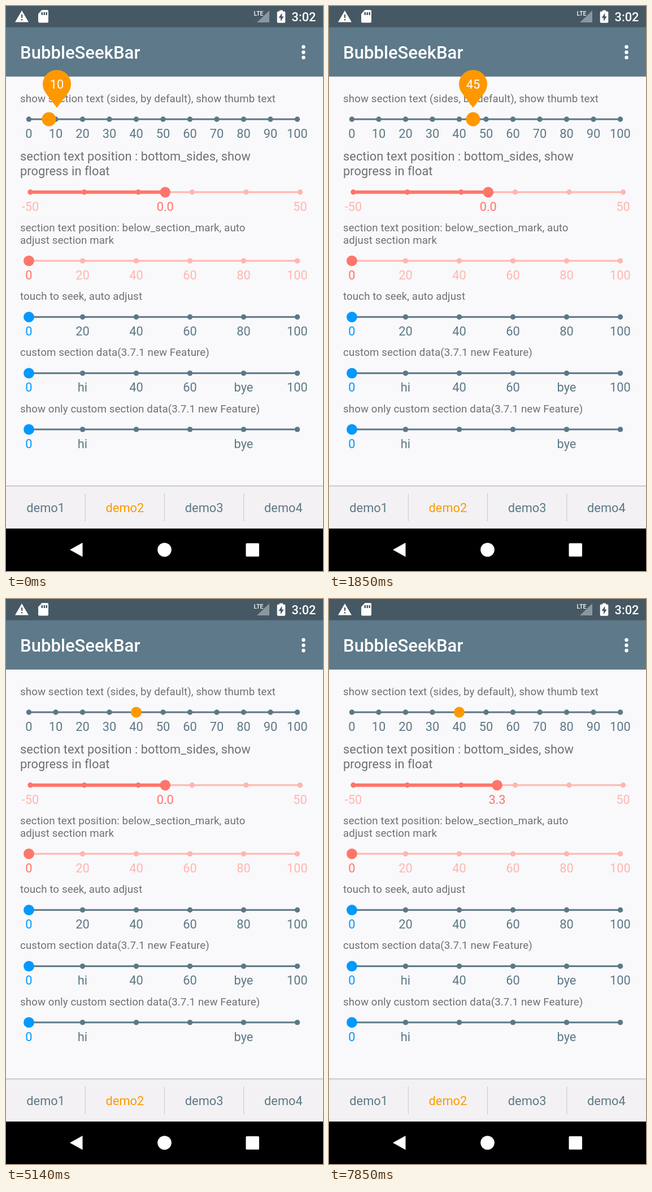
Animation of 561 by 998 pixels, one loop 8000 ms. Source, as an HTML page:

```html
<!DOCTYPE html>
<html lang="en">
<head>
<meta charset="utf-8">
<title>Seek bars</title>
<style>
  html, body { margin: 0; width: 100%; height: 100%; overflow: hidden; background: #f9f8fa; }
  svg { display: block; width: 561px; height: 998px; font: 21.8px Roboto, sans-serif; }
  .label { font-size: 18.7px; letter-spacing: .12px; fill: #706f71; }
  .label.big { font-size: 21.8px; letter-spacing: .04px; }
  .mid { text-anchor: middle; }
</style>
</head>
<body>
<svg id="stage" viewBox="0 0 561 998">
  <rect width="561" height="998" fill="#f9f8fa"/>
  <rect width="561" height="124.7" fill="#5d798a"/>
  <rect width="561" height="37.5" fill="#455864"/>

  <g fill="#fff">
    <path fill-rule="evenodd" d="M28 8 40 28.5H16ZM27 15v6h2.200v-6ZM27 23v2.400h2.200V23Z"/>
    <path fill-rule="evenodd" d="M63.500 7H73q2 0 2 2V27.500q0 2-2 2H59q-2 0-2-2V14ZM62.500 11v5H65v-5ZM66.500 11v5H69v-5ZM70.500 11v5H73v-5Z"/>
    <path fill-rule="evenodd" d="M484 9.500V7.500h6v2h2.500q1.800 0 1.800 1.800V28q0 1.800-1.800 1.800h-11q-1.800 0-1.800-1.800V11.300q0-1.800 1.800-1.800ZM488.300 12.500 482.500 21h3.500v6l5.700-8.500H488.300Z"/>
    <path d="M466 8v21h-22Z" opacity=".38"/>
    <text x="438.500" y="16.500" font-size="10.500" font-weight="500">LTE</text>
    <text x="505.500" y="27" font-weight="500">3:02</text>
    <text x="25" y="93" font-size="31.1" font-weight="500">BubbleSeekBar</text>
    <circle cx="526.500" cy="72.300" r="3.200"/>
    <circle cx="526.500" cy="81.700" r="3.200"/>
    <circle cx="526.500" cy="91" r="3.200"/>
  </g>

  <g id="bars"></g>

  <rect y="848" width="561" height="75" fill="#f3f1f4"/>
  <rect y="846.8" width="561" height="1.7" fill="#c3c2c4"/>
  <g id="tabs"></g>

  <rect y="923" width="561" height="75"/>
  <g fill="#fff">
    <path d="M113 960.500 135.500 948V973Z"/>
    <circle cx="280.500" cy="960.500" r="12.300"/>
    <rect x="424.500" y="949" width="23.500" height="23.500" rx="1.500"/>
  </g>
  <g id="bubbles"></g>
</svg>

<script>
const SLATE = '#5c7887', ORANGE = '#ff9800', RED = '#ff756a', PINK = '#ffb6b0', BLUE = '#0099ff';
const LOOP = 8000, FPS = 7;
const byId = id => document.getElementById(id);
const set = (node, attrs) => { for (const key in attrs) node.setAttribute(key, attrs[key]); };

function el(parent, tag, attrs, text = '') {
  const node = document.createElementNS('http://www.w3.org/2000/svg', tag);
  set(node, attrs);
  node.textContent = text;
  parent.appendChild(node);
  return node;
}

for (let i = 0; i < 4; i++) {
  const tabs = byId('tabs'), width = 140.25;
  el(tabs, 'text', { x: width * (i + 0.5), y: 894, class: 'mid', fill: i === 1 ? ORANGE : SLATE }, `demo${i + 1}`);
  if (i) el(tabs, 'rect', { x: width * i - 0.5, y: 861, width: 1, height: 49, fill: '#c6c5c8' });
}

// Label lines above a track with evenly spaced marks and captions below
function makeBar({ y, lines, captions, color, accent, x0 = 40.5, x1 = 515.5, size = '' }) {
  const g = el(byId('bars'), 'g', {});
  const lineHeight = size ? 25.6 : 21.6;
  lines.forEach((text, i) => {
    const lineY = y - 30.2 - lineHeight * (lines.length - 1 - i);
    el(g, 'text', { x: 25, y: lineY, class: `label ${size}` }, text);
  });
  el(g, 'rect', { x: x0, y: y - 1.5, width: x1 - x0, height: 3, fill: color });
  const step = (x1 - x0) / (captions.length - 1);
  const texts = [], marks = [];
  captions.forEach((text, i) => {
    const x = x0 + step * i;
    marks.push(el(g, 'circle', { cx: x, cy: y, r: 4.7, fill: color }));
    texts.push(el(g, 'text', { x, y: y + 32.7, class: 'mid', fill: color }, text));
  });
  const fill = el(g, 'rect', { x: x0, y: y - 3, width: 0, height: 6, fill: accent });
  const thumb = el(g, 'circle', { cx: x0, cy: y, r: 9.4, fill: accent });
  return { g, texts, marks, fill, thumb, x0, step };
}

const count = (n, by) => Array.from({ length: n }, (_, i) => i * by);
const first = makeBar({
  y: 200, color: SLATE, accent: ORANGE, captions: count(11, 10),
  lines: ['show section text (sides, by default), show thumb text']
});
const second = makeBar({
  y: 328.8, color: PINK, accent: RED, x0: 43, x1: 520.5, size: 'big',
  captions: ['-50', '', '', '', '', '50'],
  lines: ['section text position : bottom_sides, show', 'progress in float']
});
const value = el(second.g, 'text', { y: 361.5, class: 'mid', fill: RED });

const third = makeBar({
  y: 450.1, color: PINK, accent: RED, captions: count(6, 20),
  lines: ['section text position: below_section_mark, auto', 'adjust section mark']
});
third.texts[0].setAttribute('fill', RED);

[
  ['touch to seek, auto adjust', count(6, 20)],
  ['custom section data(3.7.1 new Feature)', [0, 'hi', 40, 60, 'bye', 100]],
  ['show only custom section data(3.7.1 new Feature)', [0, 'hi', '', '', 'bye', '']]
].forEach(([label, captions], i) => {
  const bar = makeBar({ y: 549.3 + 99.3 * i, color: SLATE, accent: BLUE, captions, lines: [label] });
  bar.texts[0].setAttribute('fill', BLUE);
});

// Pin shape: a 240 degree arc closed by two nearly straight sides
function makeBubble(r, top, color, textColor) {
  const g = el(byId('bubbles'), 'g', {});
  const side = r * Math.sqrt(3) / 2, low = 1.5 * r, tip = r * 8 / 3, d = 3.1;
  const path = `M0 ${tip}Q${-side - d} ${low - d} ${-side} ${low}` +
    `A${r} ${r} 0 1 1 ${side} ${low}Q${side + d} ${low - d} 0 ${tip}Z`;
  el(g, 'path', { d: path, fill: color });
  const text = el(g, 'text', { y: r + 7.8, class: 'mid', fill: textColor });
  return (x, opacity, label) => {
    set(g, { transform: `translate(${x} ${top})`, opacity });
    text.textContent = label;
  };
}
const showFirst = makeBubble(25, 113, ORANGE, '#fff');
const showSecond = makeBubble(30, 225.3, PINK, '#53616b');

// Eased change by `amount` between two ticks
function glide(k, from, to, amount) {
  const p = Math.min(1, Math.max(0, (k - from) / (to - from)));
  return amount * p * p * (3 - 2 * p);
}

function drawFirst(k) {
  const x = 76 + glide(k, 0, 5, 147) + glide(k, 6, 7, 32) + glide(k, 13, 16, -20) +
    glide(k, 19, 20, -1) + glide(k, 28, 31, -10.5) + glide(k, 31, 33, 7);
  const bubbleX = x + 14 + glide(k, 0, 3, -14);
  set(first.thumb, { cx: x, r: k < 32 ? 12.5 : 9.4 });
  showFirst(bubbleX, 1 + glide(k, 33, 36, -1), Math.round((bubbleX - first.x0) / 4.75));
}

function drawSecond(k) {
  const { x0, step, thumb, fill, marks } = second;
  const progress = glide(k, 40, 44, -19.1) + glide(k, 48, 51, 22.4);
  const x = x0 + (progress + 50) / 20 * step;
  const held = k >= 40 && k < 52;
  const label = progress.toFixed(1);
  set(thumb, { cx: x, r: held ? 12.5 : 9.4 });
  set(fill, { width: x - x0 });
  marks.forEach((mark, i) => set(mark, { fill: x0 + i * step <= x ? RED : PINK }));
  set(value, { x, opacity: held ? 0 : 1 });
  value.textContent = label;
  showSecond(x, glide(k, 39, 41, 1) + glide(k, 51, 53, -1), label);
}

function draw(t) {
  const k = Math.floor((t + 9) * FPS / 1000);
  drawFirst(k);
  drawSecond(k);
}

const start = performance.now();
function tick(now) {
  draw(Math.max(0, now - start) % LOOP);
  requestAnimationFrame(tick);
}
draw(0);
requestAnimationFrame(tick);
</script>
</body>
</html>
```
